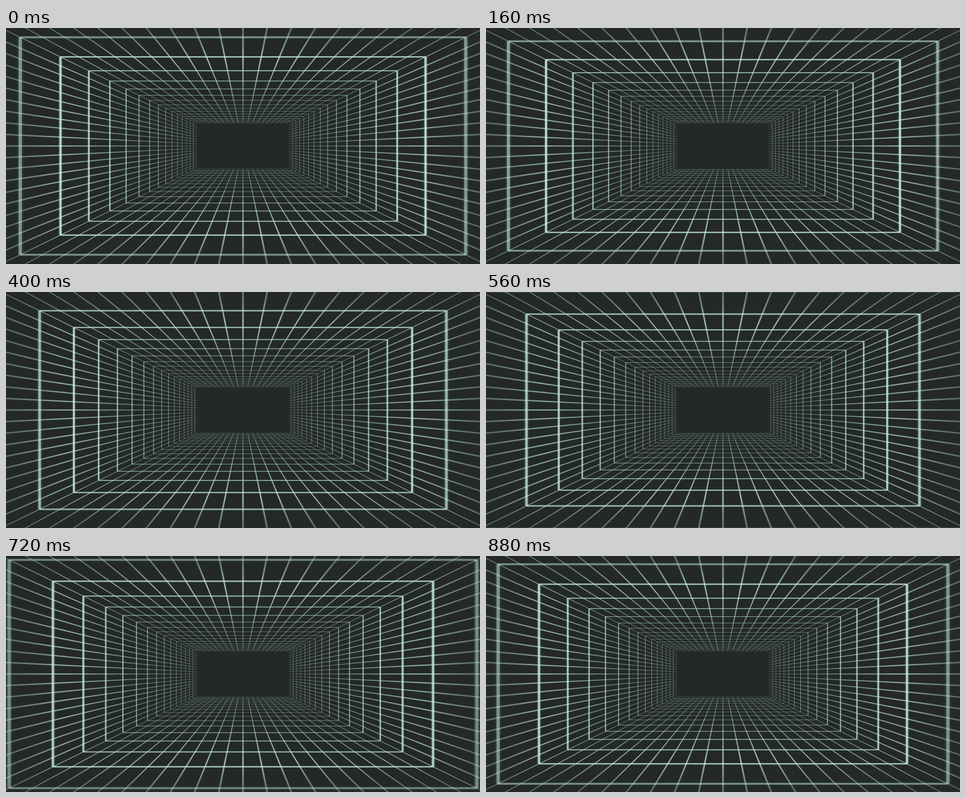
Animation of 900x450 px, one loop 920 ms. Source, as an HTML page with a canvas:

```html
<!DOCTYPE html>
<html lang="en">
<head>
<meta charset="utf-8">
<title>Grid tunnel</title>
<style>
html, body { margin: 0; height: 100%; overflow: hidden; background: #242828; }
canvas { display: block; }
</style>
</head>
<body>
<canvas id="stage" width="900" height="450"></canvas>
<script>
const ctx = document.getElementById('stage').getContext('2d');
const LOOP = 920, STEP = 40;
const HALF = 450, ASPECT = 2.04, CELLS = 10;
const NEAR = 0.0022676, SPACING = 0.000475, TAPER = 18; // depth of the rings, narrowing of the tunnel
const HOLE = 86, LINE = 0.065;                          // dark far end, line width per cell

// Brightness by distance from the centre
const FADE = [[0, 0], [HOLE, 0], [92, 0.45], [150, 0.55], [250, 0.75], [340, 0.9], [400, 0.6], [450, 0.42]];

function wallGradient(rgb, strength, sideWall) {
  const h = HALF / ASPECT;
  const g = sideWall ? ctx.createLinearGradient(-HALF, 0, HALF, 0) : ctx.createLinearGradient(0, -h, 0, h);
  for (const [a, alpha] of FADE) {
    for (const side of [-1, 1]) {
      g.addColorStop(0.5 + side * a / HALF / 2, `rgba(${rgb},${alpha * strength})`);
    }
  }
  return g;
}

const layers = [
  { rgb: '85,165,145', strength: 0.3, spread: 1.9 },
  { rgb: '208,232,226', strength: 1, spread: 1 }
].map(({ rgb, strength, spread }) => ({
  spread,
  side: wallGradient(rgb, strength, true),
  flat: wallGradient(rgb, strength, false)
}));

function quad(...p) {
  ctx.beginPath();
  for (let i = 0; i < p.length; i += 2) ctx.lineTo(p[i], p[i + 1]);
  ctx.fill();
}

function drawRays({ spread, side, flat }) {
  const near = HOLE / ASPECT, far = 225;
  for (const s of [-1, 1]) {
    ctx.fillStyle = flat;
    ctx.globalAlpha = 0.85;
    for (let k = -CELLS; k <= CELLS; k++) {
      const slope = k / CELLS * ASPECT, w0 = 0.4 * spread, w1 = 1.5 * spread;
      quad(slope * near - w0, s * near, slope * near + w0, s * near,
           slope * far + w1, s * far, slope * far - w1, s * far);
    }
    ctx.fillStyle = side;
    ctx.globalAlpha = 0.75;
    for (let k = 1 - CELLS; k < CELLS; k++) {
      const slope = k / CELLS / ASPECT, w0 = 0.3 * spread, w1 = 1.2 * spread;
      quad(s * HOLE, slope * HOLE - w0, s * HOLE, slope * HOLE + w0,
           s * HALF, slope * HALF + w1, s * HALF, slope * HALF - w1);
    }
  }
  ctx.globalAlpha = 1;
}

function drawRings({ spread, side, flat }, phase) {
  for (let n = -1; ; n++) {
    const r = 1 / (NEAR + (n + phase) * SPACING);
    const a = r - TAPER, b = a / ASPECT;
    if (a < HOLE) break;
    const w = r * r * SPACING * LINE;
    const wide = Math.max(w, 0.5) * spread, thin = Math.max(w / 2, 0.45) * spread;
    for (const s of [-1, 1]) {
      ctx.fillStyle = side;
      ctx.fillRect(s * a - wide / 2, -b, wide, 2 * b);
      ctx.fillStyle = flat;
      ctx.fillRect(-a, s * b - thin / 2, 2 * a, thin);
    }
  }
}

function draw(now) {
  const phase = Math.floor(now % LOOP / STEP) * STEP / LOOP;
  ctx.setTransform(1, 0, 0, 1, 450, 225);
  ctx.fillStyle = '#242828';
  ctx.fillRect(-450, -225, 900, 450);
  for (const layer of layers) {
    drawRays(layer);
    drawRings(layer, phase);
  }
}

const start = performance.now();
function tick() {
  draw(performance.now() - start);
  requestAnimationFrame(tick);
}
tick();
</script>
</body>
</html>
```
